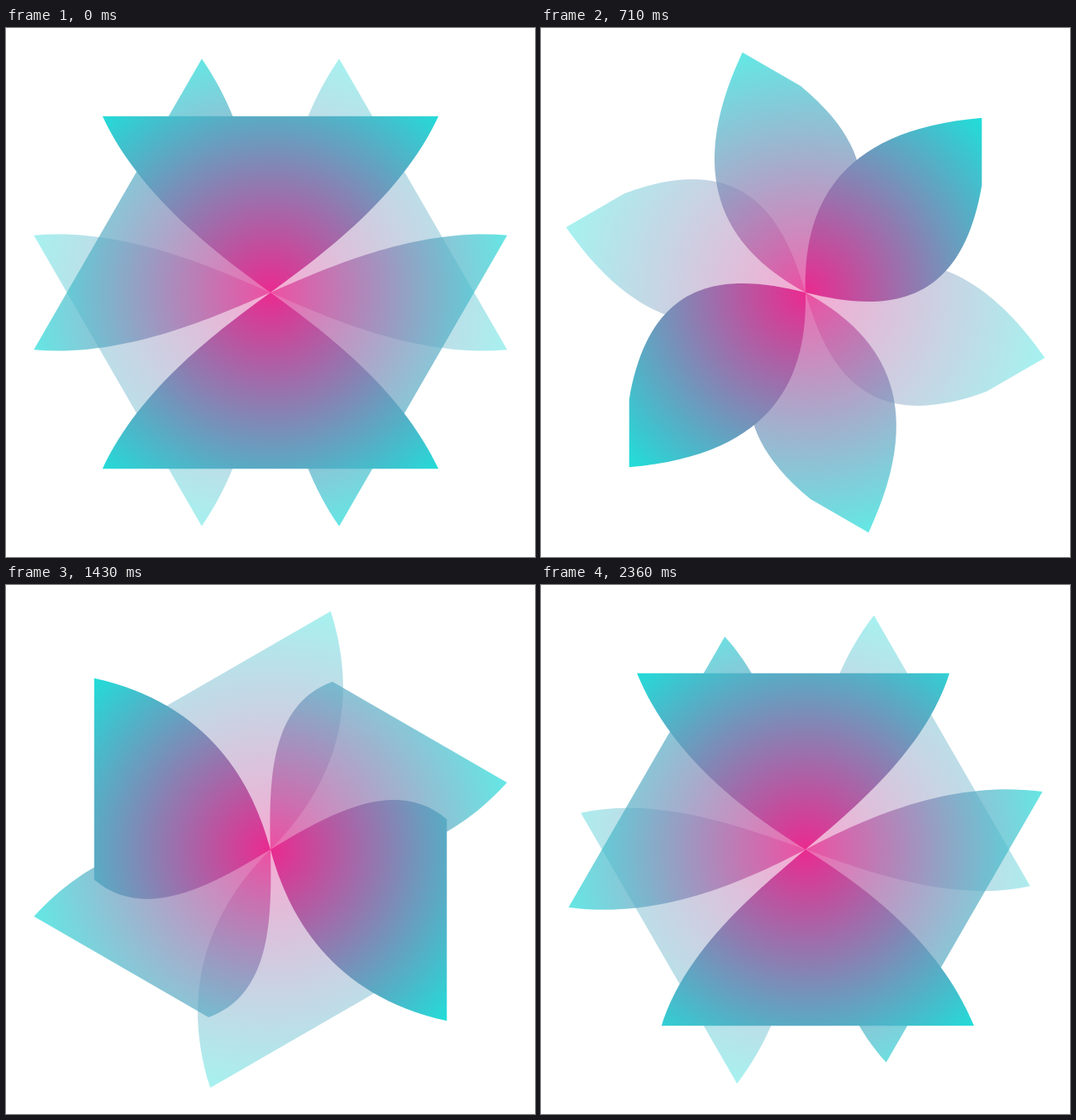
These frames come from a looping animation (640 by 640 pixels, 2430 ms). An HTML page with a canvas:

```html
<!DOCTYPE html>
<html>
<head>
<meta charset="utf-8">
<style>
  html, body { margin: 0; width: 100%; height: 100%; overflow: hidden; background: #fff; }
  canvas { display: block; width: 100vmin; height: 100vmin; }
</style>
</head>
<body>
<canvas id="stage" width="640" height="640"></canvas>
<script>
const ctx = document.getElementById('stage').getContext('2d');
const LOOP = 2430, STEPS = 34, HALF = 213.33;

const fill = ctx.createRadialGradient(0, 0, 0, 0, 0, 302);
fill.addColorStop(0, '#ea2a8f');
fill.addColorStop(1, '#1ee0da');

const mirror = pts => pts.map(([x, y]) => [-x, y]);
const swap = pts => pts.map(([x, y]) => [y, x]);
const turn = pts => pts.map(([x, y]) => [y, -x]);
const mix = (a, b, k) => a.map(([x, y], i) => [x + (b[i][0] - x) * k, y + (b[i][1] - y) * k]);

// One edge, from the centre outwards: two handles and the end point (y up)
const wide = [[-60, 44], [-157, 114], [-203.2, HALF]];
const petal = [[-14, 106], [12, 206], [HALF, HALF]];
const trailing = [wide, petal, turn(wide)];
const leading = [mirror(wide), swap(petal), turn(mirror(wide))];

const pace = [[0, 0], [.176, .2], [.353, .4], [.706, .733], [.882, .93], [1, 1]];
function ease(u) {
  const i = pace.findIndex(p => p[0] >= u);
  if (i < 1) return 0;
  const [x0, y0] = pace[i - 1], [x1, y1] = pace[i];
  return y0 + (y1 - y0) * (u - x0) / (x1 - x0);
}

function edgeAt(keys, phase) {
  const i = phase < 1 ? 0 : 1;
  return mix(keys[i], keys[i + 1], ease(phase - i));
}

function blades(a, b) {
  const path = new Path2D();
  for (const s of [1, -1]) {
    const flat = pts => pts.flat().map(v => v * s);
    path.moveTo(0, 0);
    path.bezierCurveTo(...flat(a));
    path.lineTo(...flat([b[2]]));
    path.bezierCurveTo(...flat([b[1], b[0], [0, 0]]));
    path.closePath();
  }
  return path;
}

function draw(now) {
  const step = Math.floor(now % LOOP / LOOP * STEPS + .15) % STEPS;
  const phase = step % 17 / 8.5;
  const shape = blades(edgeAt(trailing, phase), edgeAt(leading, phase));
  const quarter = step < 17 ? 0 : -90;

  ctx.setTransform(1, 0, 0, 1, 0, 0);
  ctx.globalAlpha = 1;
  ctx.fillStyle = '#fff';
  ctx.fillRect(0, 0, 640, 640);
  ctx.fillStyle = fill;
  for (const [angle, alpha] of [[120, .4], [60, .7], [0, 1]]) {
    ctx.setTransform(1, 0, 0, -1, 320, 320);
    ctx.rotate((angle + quarter) * Math.PI / 180);
    ctx.globalAlpha = alpha;
    ctx.fill(shape);
  }
}

const start = performance.now();
function tick() {
  draw(performance.now() - start);
  requestAnimationFrame(tick);
}
tick();
</script>
</body>
</html>
```
